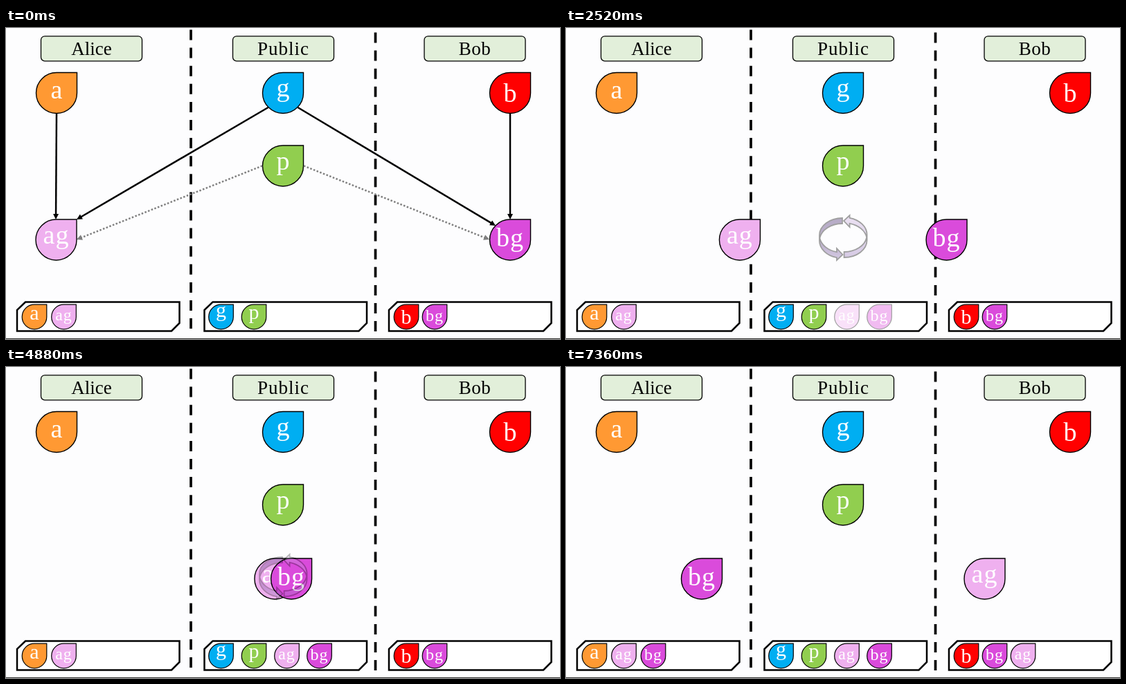
Write an HTML page that moves like this. It is 800 px wide and 450 px high and loops after 7.44 s.

```html
<!DOCTYPE html>
<html lang="en">
<head>
<meta charset="utf-8">
<title>Key exchange</title>
<style>
html, body { margin: 0; width: 100%; height: 100%; overflow: hidden; background: #fdfdfe; }
svg { display: block; width: 100vw; height: 100vh; }
text { font-family: "Liberation Serif", "Noto Serif", serif; text-anchor: middle; }
</style>
</head>
<body>
<svg id="stage" viewBox="0 0 800 450">
  <defs>
    <linearGradient id="dark" x1="0" y1="0" x2="0" y2="1">
      <stop offset="0" stop-color="#40236a"/>
      <stop offset=".6" stop-color="#55347f"/>
      <stop offset="1" stop-color="#9274b8"/>
    </linearGradient>
    <linearGradient id="light" x1="0" y1="0" x2="0" y2="1">
      <stop offset="0" stop-color="#9474ba"/>
      <stop offset="1" stop-color="#cdb2e0"/>
    </linearGradient>
  </defs>
</svg>
<script>
const LOOP = 7440, STEP = 40;
const MOVE = 2060, MEET = 1555, SWAP = 4482;
const COLORS = { a: '#ff9933', b: '#ff0000', g: '#00aef2', p: '#91ce4f', ag: '#efb0ef', bg: '#da4bdb' };
// Baselines below the drop centre: large, small
const BASE = { a: [8, 4], b: [13, 10], g: [5, 0], p: [5, 3], ag: [5, 4.5], bg: [9.5, 6] };
const stage = document.getElementById('stage');

function add(parent, tag, attrs = {}, text) {
  const el = document.createElementNS('http://www.w3.org/2000/svg', tag);
  for (const key in attrs) el.setAttribute(key, attrs[key]);
  if (text) el.textContent = text;
  parent.appendChild(el);
  return el;
}

const group = () => add(stage, 'g');
const place = (el, x, y) => el.setAttribute('transform', `translate(${x.toFixed(2)} ${y})`);
const fade = (el, value) => el.setAttribute('opacity', value.toFixed(3));

function drop(parent, name, x, y, small) {
  const r = small ? 17.8 : 29.5;
  const size = !small ? 38 : name.length > 1 ? 24 : 30;
  const el = add(parent, 'g');
  add(el, 'path', {
    d: `M0 ${-r}H${r}V0A${r} ${r} 0 1 1 0 ${-r}Z`,
    fill: COLORS[name], stroke: '#000', 'stroke-width': small ? 1.2 : 1.4
  });
  add(el, 'text', {
    y: BASE[name][small ? 1 : 0], 'font-size': size, fill: '#fff',
    'letter-spacing': name.length > 1 ? 1 : 0
  }, name);
  place(el, x, y);
  return el;
}

function title(label, x, spacing) {
  add(stage, 'rect', {
    x: x - 73, y: 11.8, width: 146, height: 36, rx: 5.5,
    fill: '#e2efda', stroke: '#000', 'stroke-width': 1.3
  });
  add(stage, 'text', { x, y: 39, 'font-size': 27, 'letter-spacing': spacing }, label);
}

function tray(x) {
  add(stage, 'path', {
    d: `M${x + 12} 396.5h222.5v30.5l-11.5 11.5h-223v-30.5z`,
    fill: '#fff', stroke: '#000', 'stroke-width': 2.5
  });
}

function divider(x, y1, y2) {
  add(stage, 'line', {
    x1: x, x2: x, y1, y2, stroke: '#000', 'stroke-width': 3.7, 'stroke-dasharray': '15 11.1'
  });
}

function arrow(parent, x1, y1, x2, y2, dotted) {
  const color = dotted ? '#7f7f7f' : '#000';
  const len = Math.hypot(x2 - x1, y2 - y1);
  const angle = Math.atan2(y2 - y1, x2 - x1) * 180 / Math.PI;
  const el = add(parent, 'g', { transform: `translate(${x1} ${y1}) rotate(${angle})` });
  add(el, 'line', {
    x2: len - 6, stroke: color, 'stroke-width': 2.5, 'stroke-dasharray': dotted ? '2.5 2.5' : 'none'
  });
  add(el, 'path', { d: `M${len} 0l-8 -4v8z`, fill: color });
}

divider(267, 2.5, 441);
divider(533.5, 6.5, 443);
title('Alice', 123.5, 0);
title('Public', 400.5, 1);
title('Bob', 677, .5);
[16, 286.5, 553].forEach(tray);
add(stage, 'rect', { y: 449, width: 800, height: 1, fill: '#333' });

drop(stage, 'a', 73, 94);
drop(stage, 'g', 400, 94);
drop(stage, 'b', 728, 94);
drop(stage, 'p', 400, 199.5);
[['a', 41], ['ag', 83.5], ['g', 310.5], ['p', 358], ['b', 578], ['bg', 619]]
  .forEach(([name, x]) => drop(stage, name, x, 418, true));

const shared = group();
drop(shared, 'ag', 405.5, 418, true);
drop(shared, 'bg', 452.5, 418, true);

const received = group();
drop(received, 'bg', 126, 418, true);
drop(received, 'ag', 660, 418, true);

const links = group();
arrow(links, 370, 199.5, 102, 306, true);
arrow(links, 430, 199.5, 698, 306, true);
arrow(links, 73, 124, 72, 277);
arrow(links, 378.5, 115, 102, 277);
arrow(links, 421.5, 115, 707, 286);
arrow(links, 728, 124, 728, 277);

const ag = drop(stage, 'ag', 72.5, 306.5);
const bg = drop(stage, 'bg', 728, 306.5);

const cycle = group();
const bend = 'M399 275A33 25 0 0 0 366 300V308A33 25 0 0 0 391 332.2V336L399.5 328L391 319V324.2' +
  'A33 25 0 0 1 366.4 304A33 25 0 0 1 399 283Z';
for (const [fill, turn] of [['dark', 0], ['light', 180]]) {
  add(cycle, 'path', {
    d: bend, fill: `url(#${fill})`, stroke: '#000', 'stroke-width': 1.8,
    transform: `rotate(${turn} 400.3 303.5)`
  });
}

const clamp = v => Math.max(0, Math.min(1, v));
const mix = (a, b, k) => a + (b - a) * k;

// cubic-bezier(.25, .1, .25, 1)
function ease(u) {
  if (u <= 0 || u >= 1) return clamp(u);
  let lo = 0, hi = 1, s;
  for (let i = 0; i < 24; i++) {
    s = (lo + hi) / 2;
    if (.75 * s * (1 - s) + s ** 3 < u) lo = s; else hi = s;
  }
  return .3 * s * (1 - s) ** 2 + 3 * s * s * (1 - s) + s ** 3;
}

const fadeIn = u => clamp((u - .3) / .45);
const fadeOut = u => 1 - clamp(u / .27);

function draw(time) {
  const t = Math.floor(time % LOOP / STEP) * STEP;
  const meet = clamp((t - MEET) / MOVE);
  const swap = clamp((t - SWAP) / MOVE);
  const x = mix(mix(72.5, 304.5, ease(meet)), 604.5, ease(swap));
  place(ag, x, 306.5);
  place(bg, 800.5 - x, 306.5);
  fade(links, fadeOut(meet));
  fade(shared, fadeIn(meet));
  fade(cycle, fadeIn(meet) * fadeOut(swap));
  fade(received, fadeIn(swap));
}

const start = performance.now();
function tick() {
  draw(performance.now() - start);
  requestAnimationFrame(tick);
}
tick();
</script>
</body>
</html>
```
